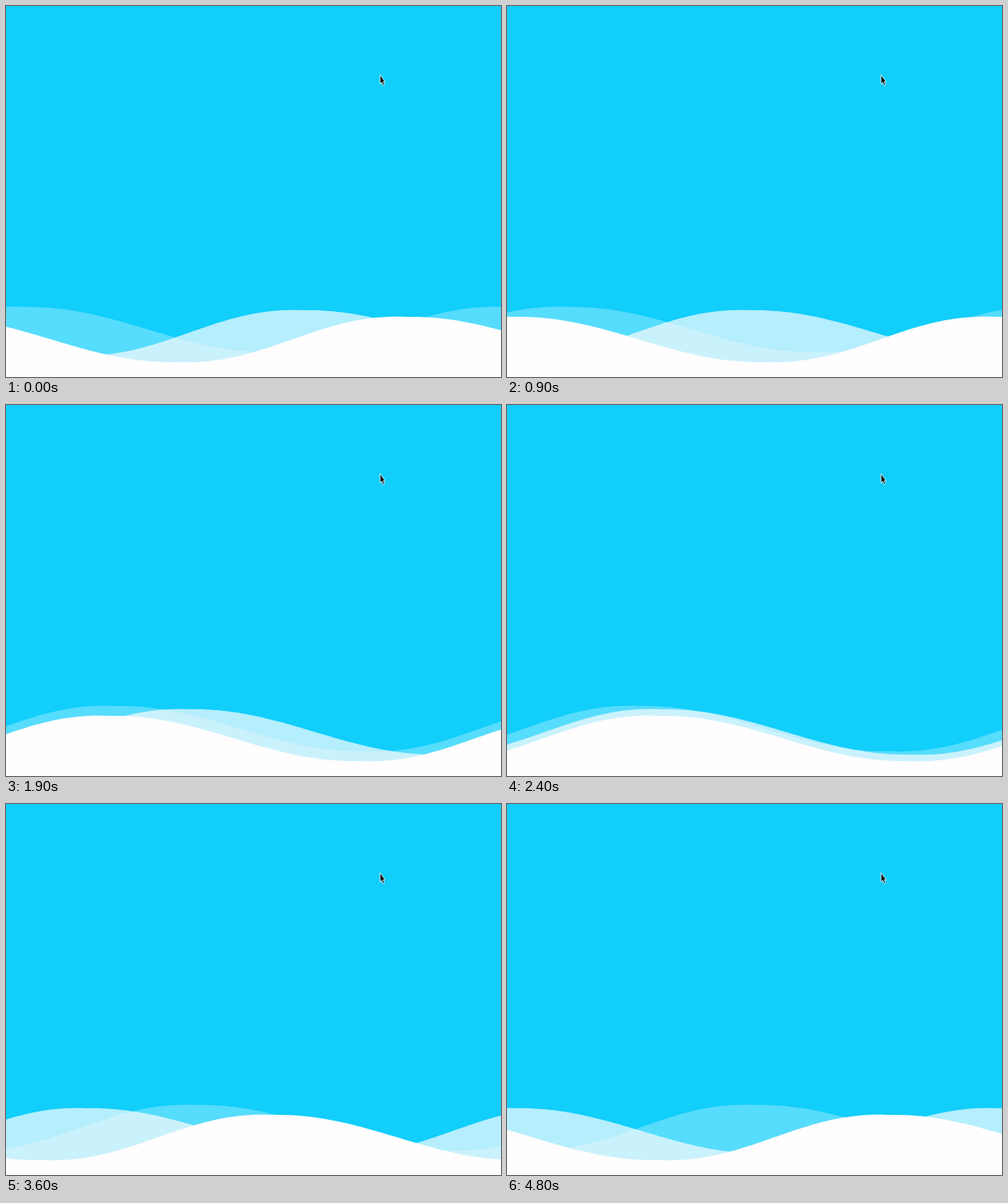
Animation of 600 by 450 pixels, one loop 4900 ms. Source, as an HTML page:

```html
<!DOCTYPE html>
<html lang="en">
<head>
<meta charset="utf-8">
<title>Waves</title>
<style>
  html, body { margin: 0; width: 100%; height: 100%; overflow: hidden; background: #11cefb; }
  svg { display: block; width: 600px; height: 450px; }
  .wave { fill: #fffdfd; animation: drift 4.9s steps(49) infinite; }
  /* --shift is speed in px/s times the 4.9 s loop */
  #back { fill-opacity: .29; --shift: 285.67px; }
  #middle { fill-opacity: .69; --shift: -357.09px; }
  #front { --shift: 571.34px; }
  @keyframes drift { to { transform: translateX(var(--shift)); } }
</style>
</head>
<body>
<svg viewBox="0 0 600 450">
  <path class="wave" id="back"/>
  <path class="wave" id="middle"/>
  <path class="wave" id="front"/>
  <path d="M453.3 83.3V94.6L455.4 92.6L457 96.3L458.8 95.5L457.3 91.9H459.6Z"
        fill="#111" stroke="#e8f8fd" stroke-width=".8" stroke-linejoin="round"/>
</svg>
<script>
  const FALL = 305, RISE = 278, PERIOD = FALL + RISE, HEIGHT = 55;

  // Drop below the crest at distance d to the right of it.
  function drop(d) {
    d = ((d % PERIOD) + PERIOD) % PERIOD;
    const falling = d < FALL;
    const u = Math.PI * (falling ? d / FALL : (PERIOD - d) / RISE);
    const skew = falling ? 0.8 : 1.8;
    return HEIGHT / 2 * (1 - Math.cos(u)) - skew * Math.sin(2 * u);
  }

  function drawWave(id, crestX, crestY) {
    let d = "M-620 460";
    for (let x = -620; x <= 1220; x += 4) {
      d += `L${x} ${(crestY + drop(x - crestX)).toFixed(2)}`;
    }
    document.getElementById(id).setAttribute("d", d + "V460Z");
  }

  drawWave("back", 20, 365);
  drawWave("middle", 360, 369);
  drawWave("front", 485.5, 377);
</script>
</body>
</html>
```
